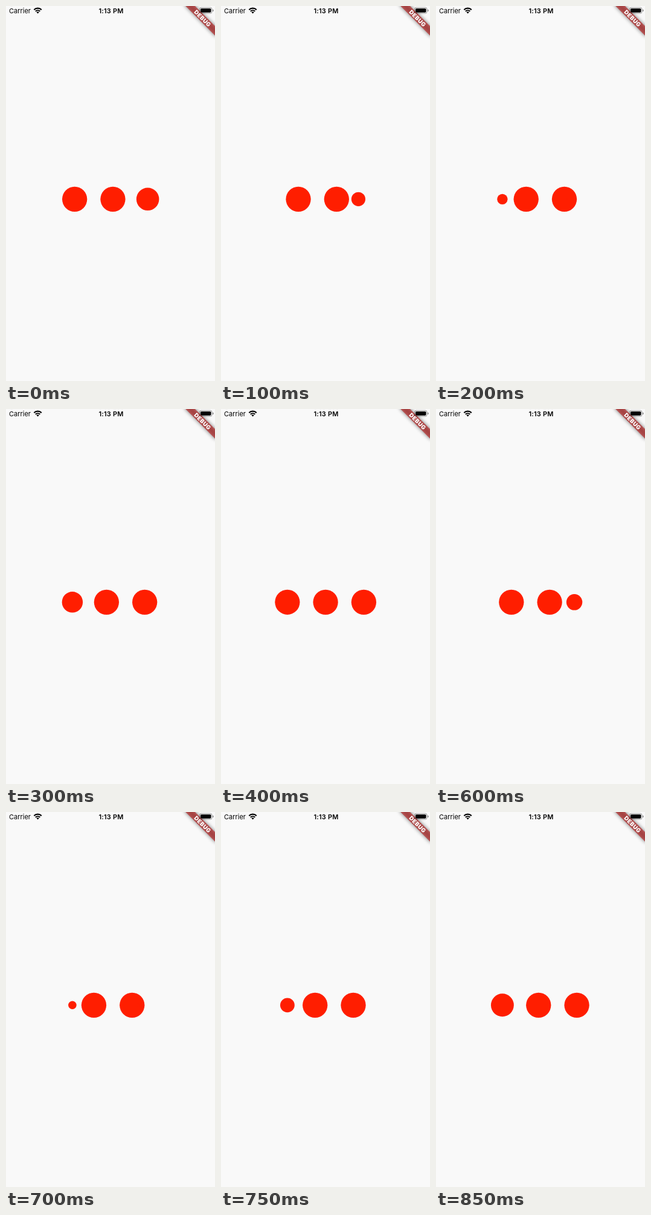
These frames come from a looping animation (346 px wide and 618 px high, 0.9 s). An HTML page:

```html
<!DOCTYPE html>
<html lang="en">
<head>
<meta charset="utf-8">
<title>Progressive dots</title>
<style>
  html, body { margin: 0; width: 100%; height: 100%; overflow: hidden; background: #f9f9f9; }
  svg { display: block; width: 346px; height: 618px; font-family: Inter, Roboto, sans-serif; }
</style>
</head>
<body>
<svg viewBox="0 0 346 618">
  <defs>
    <filter id="blur" x="-50%" y="-200%" width="200%" height="500%">
      <feGaussianBlur stdDeviation="3.7"/>
    </filter>
  </defs>

  <g id="dots" fill="#ff1e00">
    <circle/><circle/><circle/><circle/>
  </g>

  <!-- corner ribbon -->
  <g transform="translate(347.6 -2) rotate(45) scale(.926)">
    <rect x="-40" y="28" width="80" height="12" opacity=".5" filter="url(#blur)"/>
    <rect x="-40" y="28" width="80" height="12" fill="#b71c1c" fill-opacity=".627"/>
    <text x="0.2" y="37.7" font-size="10.2" font-weight="900" letter-spacing=".4" text-anchor="middle" fill="#fff">DEBUG</text>
  </g>

  <!-- status bar -->
  <text x="5" y="11.7" font-size="11">Carrier</text>
  <text x="174" y="11.8" font-size="11" font-weight="600" letter-spacing=".15" text-anchor="middle">1:13 PM</text>
  <g fill="none" stroke="#000" stroke-width="2.2">
    <path d="M46.4 6.3A8.7 8.7 0 0 1 58.8 6.3M48.9 8.75A5.3 5.3 0 0 1 56.3 8.75"/>
    <path d="M52.6 12.5L50.4 10.3A3.1 3.1 0 0 1 54.8 10.3Z" fill="#000" stroke="none"/>
  </g>
  <rect x="320.5" y="2.4" width="20.5" height="9.8" rx="2.8" fill="none" stroke="#000" stroke-opacity=".38"/>
  <rect x="322" y="3.9" width="17.5" height="6.8" rx="1.6"/>
  <path d="M342 5.6a1.8 1.8 0 0 1 0 3.6z" opacity=".4"/>
</svg>

<script>
  const LOOP = 900, CYCLE = 500;
  const SIZE = 41.3, STEP = 63.3, LEFT = 109.9, Y = 318.3;
  const dots = document.querySelectorAll('#dots circle');

  // cubic-bezier(.42, 0, .58, 1)
  function easeInOut(x) {
    let lo = 0, hi = 1;
    for (let i = 0; i < 24; i++) {
      const s = (lo + hi) / 2, r = 1 - s;
      if (1.26 * s * r * r + 1.74 * s * s * r + s * s * s < x) lo = s; else hi = s;
    }
    return lo * lo * (3 - 2 * lo);
  }

  function place(dot, x, size) {
    dot.setAttribute('cx', x);
    dot.setAttribute('cy', Y);
    dot.setAttribute('r', Math.max(0, size) / 2);
  }

  // The second cycle starts after a short rest at the end of the first.
  const phase = t => t < 433 ? Math.min(1, 0.169 + t / CYCLE) : (t - 433) / CYCLE;

  function draw(t) {
    const shift = STEP * easeInOut(phase(t));
    const leaving = Math.max(0, SIZE - shift);
    place(dots[0], LEFT, SIZE - STEP + shift);
    place(dots[1], LEFT + shift, SIZE);
    place(dots[2], LEFT + STEP + shift, SIZE);
    place(dots[3], LEFT + 2 * STEP - SIZE / 2 + leaving / 2, leaving);
  }

  const start = performance.now();
  function frame() {
    draw((performance.now() - start) % LOOP);
    requestAnimationFrame(frame);
  }
  frame();
</script>
</body>
</html>
```
